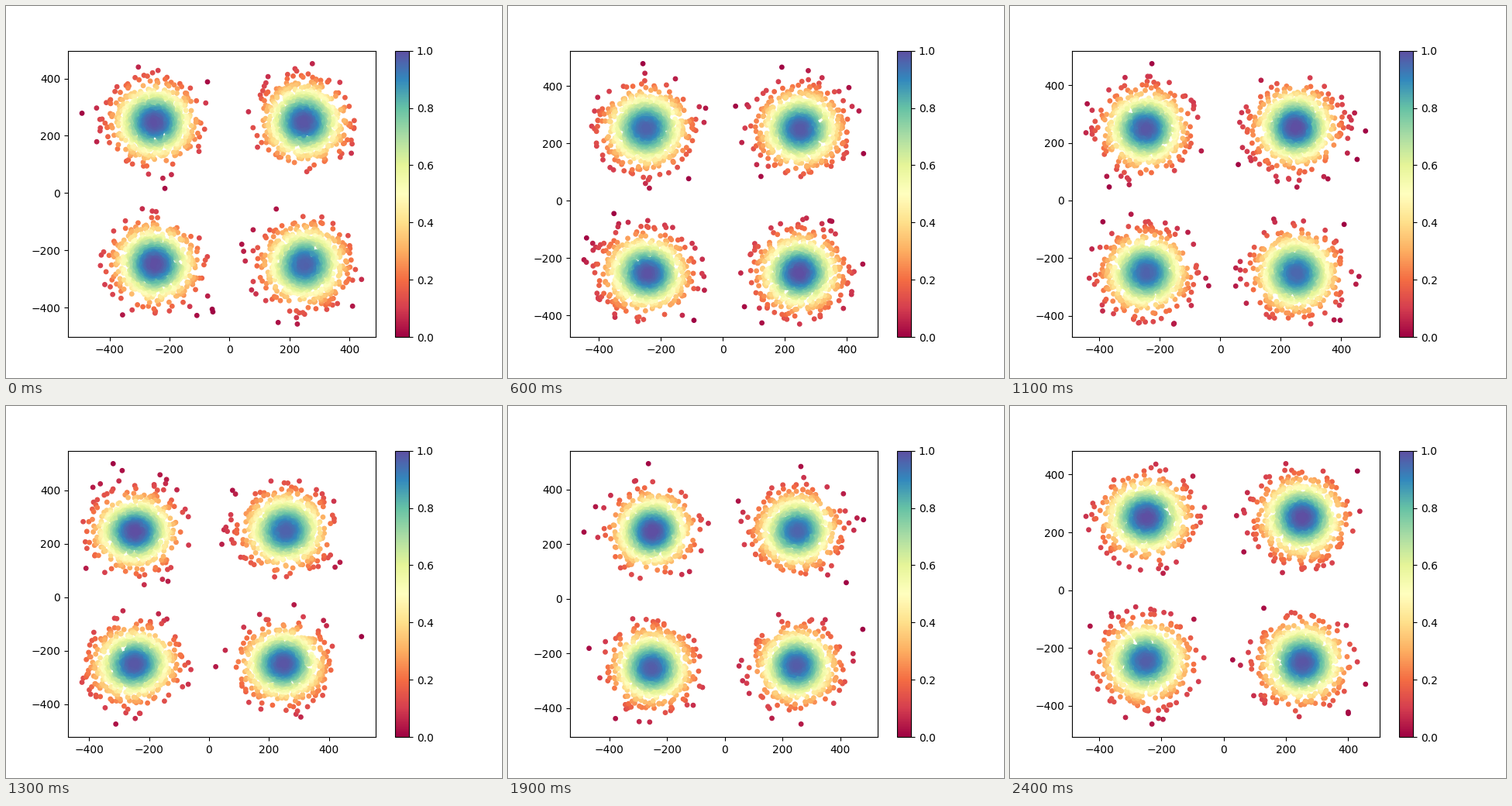
A matplotlib script that plays this animation: 640 by 480 pixels, repeating every 2.5 s.

```python
import numpy as np
import matplotlib.pyplot as plt
from matplotlib.animation import FuncAnimation

FRAMES, INTERVAL = 25, 100
CENTER, SPREAD, PER_CLUSTER = 250, 62, 1000
SIGNS = np.array([(-1, 1), (1, 1), (-1, -1), (1, -1)])


def sample(step):
    """Four Gaussian blobs, redrawn for every step."""
    rng = np.random.default_rng(step)
    offsets = rng.normal(0, SPREAD, (len(SIGNS), PER_CLUSTER, 2))
    return (CENTER * SIGNS[:, None] + offsets).reshape(-1, 2)


def density(points):
    """Gaussian kernel density with Scott's bandwidth, scaled to 0..1."""
    width = points.std(0) * len(points) ** (-1 / 6)
    u = (points / width).astype(np.float32)
    half = (u ** 2).sum(1) / 2
    kernel = u @ u.T
    kernel -= half
    kernel -= half[:, None]
    z = np.exp(kernel, out=kernel).sum(1)
    return (z - z.min()) / (z.max() - z.min())


def build(step):
    """Points and densities, densest last so they are drawn on top."""
    points = sample(step)
    z = density(points)
    order = z.argsort()
    return points[order], z[order]


def padded(values):
    low, high = values.min(), values.max()
    pad = 0.05 * (high - low)
    return low - pad, high + pad


steps = [build(i) for i in range(FRAMES)]

fig, ax = plt.subplots(figsize=(6.4, 4.8), dpi=100)
points, z = steps[0]
dots = ax.scatter(*points.T, c=z, s=15, cmap="Spectral", vmin=0, vmax=1)
fig.colorbar(dots)


def update(i):
    points, z = steps[i]
    dots.set_offsets(points)
    dots.set_array(z)
    ax.set_xlim(padded(points[:, 0]))
    ax.set_ylim(padded(points[:, 1]))
    return dots,


anim = FuncAnimation(fig, update, frames=FRAMES, interval=INTERVAL,
                     repeat=True, repeat_delay=0)
plt.show()
```
